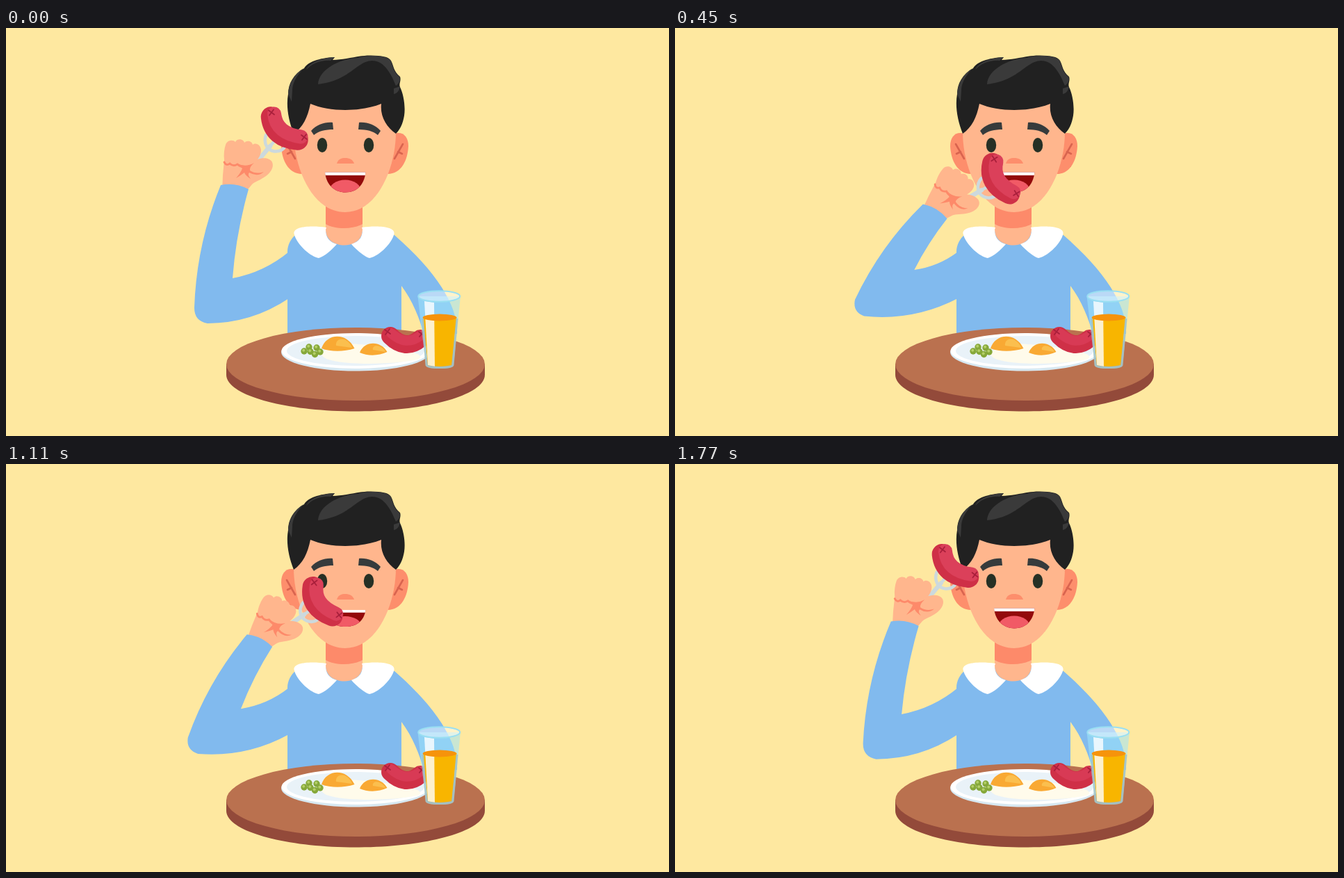
Write an HTML page that moves like this. It is 954 by 587 pixels and loops after 1800 ms.

```html
<!DOCTYPE html>
<html lang="en">
<head>
<meta charset="utf-8">
<title>Breakfast</title>
<style>
html, body { margin: 0; width: 100%; height: 100%; overflow: hidden; background: #fee8a0; }
svg { display: block; width: 100%; height: 100%; }
</style>
</head>
<body>
<svg viewBox="0 0 954 587">
  <defs>
    <path id="ear" d="M417 152C404 148 396 156 396 170C397 190 406 210 426 210Z" fill="#fd8e6c"/>
    <path id="earLine" d="M404 167L416 188M411 178L405 181" fill="none" stroke="#d9644f" stroke-width="2.6" stroke-linecap="round"/>
    <path id="brow" d="M439 148C447 139 459 135 470 136L471 146C460 146 450 148 443 154Z" fill="#363b3c"/>
    <ellipse id="eye" cx="455" cy="168.5" rx="7.2" ry="10.5" fill="#263025"/>
    <path id="collar" d="M461 287C440 284 413 285 414.5 296C418 312 440 330 450 331C458 329 470 318 476 311C466 308 460 302 460 290Z" fill="#fff"/>
    <path id="cross" d="M-4 -3L4 3M-3 4L3 -4" stroke="#a91f3b" stroke-width="1.8" stroke-linecap="round"/>
    <clipPath id="lips"><path d="M459 207.500C461 228 475 236.500 488 236.500C503 236.500 515 228 517.500 207.500Z"/></clipPath>
  </defs>

  <!-- body -->
  <path fill="#81baee" d="M417 297C410 303 405 312 405 322V450H569V371C585 392 596 420 601 440H649C651 402 622 353 559 298C540 290 440 290 417 297Z"/>
  <path fill="#ffb68d" d="M460 245H513V290C513 305 500 312.500 487 312.500C473 312.500 460 305 460 290Z"/>
  <path fill="#fd8a6a" d="M460 245H513V282C500 290 473 290 460 282Z"/>
  <use href="#collar"/><use href="#collar" transform="matrix(-1 0 0 1 973 0)"/>

  <!-- head -->
  <use href="#ear"/><use href="#ear" transform="matrix(-1 0 0 1 975 0)"/>
  <use href="#earLine"/><use href="#earLine" transform="matrix(-1 0 0 1 975 0)"/>
  <path fill="#ffb68d" d="M414 100V150C414 200 440 265 488 265C535 265 561 200 561 150V100Z"/>
  <path fill="#212121" d="M414 152C406 132 403 112 406 95C406 80 414 66 429 58C434 49 450 43 473 42L470 46C488 46 508 39 525 39.500C541 40 550 41 554 47C558 54 557 62 567 70C569 76 565 80 567 85C572 95 575 113 573 126C571 138 567 146 561 152C547 142 538 127 540 109C510 121 466 121 438 109C434 129 427 143 414 152Z"/>
  <g fill="#3a3a3a">
    <path d="M449 81C450 60 480 44 506 43C520 38 546 39 553 46C557 54 557 64 566 70C568 76 565 80 561 83C555 68 545 47 527 47C505 47 495 76 449 81Z"/>
    <path d="M432 60C437 49 455 43 473 42L467 47C452 46 441 51 432 60Z"/>
    <path d="M406 95C407 80 415 66 428 58C417 70 412 80 412 90L411 106Z"/>
    <path d="M558 95C563 94 566 90 567 84L558 87Z"/>
  </g>
  <use href="#brow"/><use href="#brow" transform="matrix(-1 0 0 1 978 0)"/>
  <use href="#eye"/><use href="#eye" x="67"/>
  <path fill="#fd8e6c" d="M476 195C478 188 483 187 488 187C494 187 499 189 501 195Z"/>
  <g id="mouth"><g clip-path="url(#lips)">
    <path fill="#930a0b" d="M455 205H520V240H455Z"/>
    <ellipse cx="488" cy="235" rx="23" ry="16.5" fill="#f15a66"/>
    <path fill="#fff" d="M455 205H520V212H455Z"/>
  </g></g>

  <!-- fork with sausage -->
  <g id="fork" fill="none" stroke-linecap="round">
    <path stroke="#ccd9dd" stroke-width="6.5" d="M360 194L380 170"/>
    <path stroke="#ccd9dd" stroke-width="4.5" d="M380 170L392 156M374 154C370 166 376 176 386 177.500C393 178 399 175 402 170"/>
    <path stroke="#cf3047" stroke-width="29.5" d="M381.500 128Q385 158 420 161"/>
    <path stroke="#db405a" stroke-width="20" d="M386 123.500Q389 152 424.500 156.500"/>
    <use href="#cross" x="382" y="121.5"/><use href="#cross" x="429" y="157"/>
  </g>

  <!-- hand -->
  <g id="hand">
    <path fill="#ffb68d" d="M311 236L312 212L314 190C313 182 314 174 316 168C318 161 327 160 330 164C333 158 342 160 343 165C347 161 354 163 355 168C360 164 367 169 367 176C367 181 365 185 362 189C370 186 380 187 383 193C386 200 381 208 374 213C366 219 358 221 354 225L344 237Z"/>
    <path fill="none" stroke="#fd8a6a" stroke-width="2.8" stroke-linecap="round" d="M314 193Q317 199 322 195Q327 200 333 196Q337 200 343 200"/>
    <path fill="#fd8a6a" d="M333 195Q345 201 357 194Q350 200 351 205Q360 211 371 207Q362 215 350 208Q347 211 352 217Q344 212 343 208Q338 212 331 216Q338 208 340 202Z"/>
  </g>
  <path id="sleeve" fill="#81baee"/>

  <!-- table and plate -->
  <path fill="#934a3a" d="M317 483H689V499C689 528 606 551.500 503 551.500S317 528 317 499Z"/>
  <ellipse cx="503" cy="483.5" rx="186" ry="52.5" fill="#ba714f"/>
  <ellipse cx="503" cy="466.5" rx="107" ry="27" fill="#d7e8f1"/>
  <ellipse cx="503" cy="464.5" rx="106.5" ry="25.5" fill="#fff"/>
  <ellipse cx="503" cy="464.5" rx="99" ry="21.5" fill="#e9f2f8"/>
  <path fill="#fffbeb" d="M458 464C470 449 510 455 545 459C585 464 606 471 592 477C560 484 500 485 472 479C455 476 450 469 458 464Z"/>
  <path fill="#f9a933" d="M454 461C461 439 490 437 501.500 461C486 466 467 466 454 461ZM509 467C516 449 540 450 548.500 466C536 472 520 472 509 467Z"/>
  <path fill="#fbbf4e" d="M475 457C474 450 480 446 487 448C493 451 497 456 498 460ZM528 463C527 458 532 456 537 458C542 460 545 463 546 466Z"/>
  <g id="peas"></g>
  <g fill="none" stroke-linecap="round">
    <path stroke="#cf3047" stroke-width="26" d="M553 443Q575 465 596 447"/>
    <path stroke="#d83a55" stroke-width="14" d="M554 439Q576 459 597 442"/>
    <use href="#cross" x="549" y="437"/><use href="#cross" x="598" y="440"/>
  </g>

  <!-- glass -->
  <path fill="#9fe6fb" fill-opacity=".55" d="M592.500 386L604 485Q605 490 624 490T644 485L654 386Z"/>
  <path fill="#f8b500" d="M600 416H648.500L641 485Q624 489 607 485Z"/>
  <path fill="#fff" fill-opacity=".8" d="M602 393L616 395L617 487L607 485Z"/>
  <ellipse cx="624" cy="416.5" rx="24.3" ry="5" fill="#f6930b"/>
  <path fill="none" stroke="#a5c4c5" stroke-width="3" stroke-opacity=".85" d="M599.500 418L605 485Q606 488.500 624 488.500T643 485L649 418"/>
  <ellipse cx="623.3" cy="386" rx="30" ry="7.7" fill="#fff" fill-opacity=".45" stroke="#9adff2" stroke-width="2"/>
</svg>
<script>
const $ = id => document.getElementById(id);
const LOOP = 1800, STEP = 30, BITE = 600, SWING = 30;
const handPivot = [264, 360], forkPivot = [233, 372];

const lerp = (a, b, u) => a + (b - a) * u;
const between = (a, b, u) => a.map((v, i) => lerp(v, b[i], u));

function turn([x, y], [cx, cy], degrees) {
  const a = degrees * Math.PI / 180, c = Math.cos(a), s = Math.sin(a);
  return [cx + (x - cx) * c - (y - cy) * s, cy + (x - cx) * s + (y - cy) * c];
}

// Curve from a to b, bent sideways by a share of its length
function bow(a, b, bend) {
  const [mx, my] = between(a, b, 0.5);
  return `Q${mx - (b[1] - a[1]) * bend} ${my + (b[0] - a[0]) * bend} ${b}`;
}

function sleevePath(p) {
  const cuffOut = turn([309, 226], handPivot, SWING * p);
  const cuffIn = turn([349, 232], handPivot, SWING * p);
  const elbowSide = between([271, 402], [255, 387], p);
  const elbowBase = between([290, 425], [266, 411], p);
  const elbowIn = between([326, 360], [355, 341], p ** 1.6);
  const armpit = [407, 389], shoulder = [407, 322];
  return `M${cuffOut}` + bow(cuffOut, elbowSide, 0.09) + bow(elbowSide, elbowBase, 0.43) +
    bow(elbowBase, armpit, 0.15) + `L${shoulder}` + bow(shoulder, elbowIn, -0.13) +
    bow(elbowIn, cuffIn, -0.05) + bow(cuffIn, cuffOut, 0.18) + 'Z';
}

// Opens wide on the way in, closes on the bite, then relaxes
const mouthScale = t =>
  t < BITE / 2 ? lerp(1, 1.3, t / (BITE / 2)) :
  t < BITE ? lerp(1.3, 0.71, t / (BITE / 2) - 1) :
  lerp(0.71, 1, (t - BITE) / (LOOP - BITE));

$('peas').innerHTML = [[436, 459], [447, 460], [429, 465], [452, 466], [438, 465.5], [444.5, 469.5]].map(([x, y]) =>
  `<circle cx="${x}" cy="${y}" r="4.7" fill="#86a83a"/><circle cx="${x - 0.8}" cy="${y - 1.2}" r="2" fill="#b4cf68"/>`).join('');

function draw(now) {
  const t = Math.floor(now % LOOP / STEP) * STEP;
  const p = t < BITE ? t / BITE : (LOOP - t) / (LOOP - BITE);
  $('fork').setAttribute('transform', `rotate(${0.9 * SWING * p} ${forkPivot})`);
  $('hand').setAttribute('transform', `rotate(${SWING * p} ${handPivot})`);
  $('sleeve').setAttribute('d', sleevePath(p));
  $('mouth').setAttribute('transform', `translate(0 222) scale(1 ${mouthScale(t)}) translate(0 -222)`);
}

let start;
function tick(now) {
  start ??= now;
  draw(now - start);
  requestAnimationFrame(tick);
}
draw(0);
requestAnimationFrame(tick);
</script>
</body>
</html>
```
